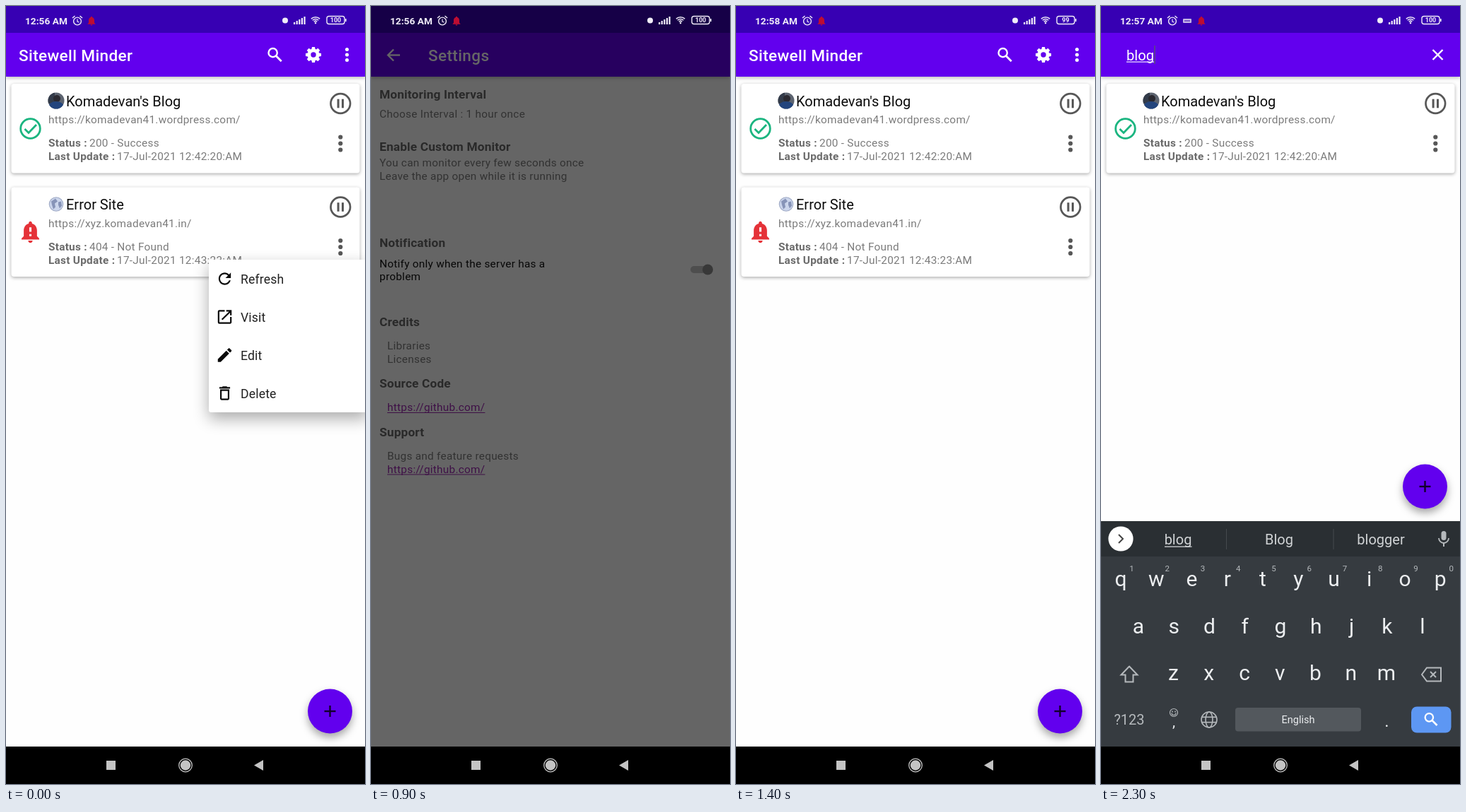
Recreate the animation shown at these times as an HTML page with a canvas. Size 508 by 1101 pixels, loop 2.6 s.

```html
<!DOCTYPE html>
<html lang="en">
<head>
<meta charset="utf-8">
<title>Sitewell Minder</title>
<style>
html, body { margin: 0; width: 100%; height: 100%; overflow: hidden; background: #fff; }
canvas { display: block; width: 508px; height: 1101px; }
</style>
</head>
<body>
<canvas id="stage" width="508" height="1101"></canvas>
<script>
const ctx = document.getElementById('stage').getContext('2d');
const W = 508, H = 1101, TAU = Math.PI * 2;
const PURPLE = '#6200ee', DEEP = '#3700b3', ACCENT = '#9c27b0';
const INK = '#212121', GREY = '#7b7b7b', ICON = '#575757', RED = '#e53238';
const BLOG = 'https://komadevan41.wordpress.com/';
const SITE = 'https://xyz.komadevan41.in/';
const APP = 'Sitewell Minder';

const ICONS = {
  refresh: 'M17.65 6.35C16.2 4.9 14.21 4 12 4c-4.42 0-7.99 3.58-7.99 8s3.57 8 7.99 8c3.73 0 6.84-2.55 7.73-6h-2.08c-.82 2.33-3.04 4-5.65 4-3.31 0-6-2.69-6-6s2.69-6 6-6c1.66 0 3.14.69 4.22 1.78L13 11h7V4z',
  visit: 'M19 19H5V5h7V3H5a2 2 0 0 0-2 2v14a2 2 0 0 0 2 2h14c1.1 0 2-.9 2-2v-7h-2zM14 3v2h3.59l-9.83 9.83 1.41 1.41L19 6.41V10h2V3z',
  edit: 'M3 17.25V21h3.75L17.81 9.94l-3.75-3.75zM20.71 7.04c.39-.39.39-1.02 0-1.41l-2.34-2.34c-.39-.39-1.02-.39-1.41 0l-1.83 1.83 3.75 3.75z',
  remove: 'M6 19c0 1.1.9 2 2 2h8c1.1 0 2-.9 2-2V7H6zM8 9h8v10H8zm7.5-5l-1-1h-5l-1 1H5v2h14V4z',
  alert: 'M18 16v-5c0-3.07-1.64-5.64-4.5-6.32V4c0-.83-.67-1.5-1.5-1.5s-1.5.67-1.5 1.5v.68C7.63 5.36 6 7.92 6 11v5l-2 2v1h16v-1zm-5 0h-2v-2h2zm0-4h-2V8h2zm-1 10c1.1 0 2-.9 2-2h-4c0 1.1.89 2 2 2z',
  bell: 'M18 16v-5c0-3.07-1.64-5.64-4.5-6.32V4c0-.83-.67-1.5-1.5-1.5s-1.5.67-1.5 1.5v.68C7.63 5.36 6 7.92 6 11v5l-2 2v1h16v-1zm-6 6c1.1 0 2-.9 2-2h-4c0 1.1.89 2 2 2z'
};
for (const k in ICONS) ICONS[k] = new Path2D(ICONS[k]);

// ---------- basic shapes ----------
function icon(name, x, y, size, color) {
  ctx.save();
  ctx.translate(x - size / 2, y - size / 2);
  ctx.scale(size / 24, size / 24);
  ctx.fillStyle = color;
  ctx.fill(ICONS[name]);
  ctx.restore();
}
function text(s, x, cy, size, color, { w = 400, ls = 0, align = 'left' } = {}) {
  ctx.font = `${w} ${size}px Roboto, "Noto Sans", sans-serif`;
  ctx.letterSpacing = ls * size + 'px';
  ctx.textAlign = align;
  ctx.fillStyle = color;
  ctx.fillText(s, x, cy + size * 0.355);
}
const body = (s, x, cy, color = GREY, w = 400) => text(s, x, cy, 15.35, color, { w, ls: 0.0178 });

function rect(x, y, w, h, color) {
  ctx.fillStyle = color;
  ctx.fillRect(x, y, w, h);
}
function box(x, y, w, h, r, color) {
  ctx.beginPath();
  ctx.roundRect(x, y, w, h, r);
  ctx.fillStyle = color;
  ctx.fill();
}
function frame(x, y, w, h, r, lw, color) {
  ctx.beginPath();
  ctx.roundRect(x, y, w, h, r);
  ctx.lineWidth = lw;
  ctx.strokeStyle = color;
  ctx.stroke();
}
function disc(x, y, r, color) {
  ctx.beginPath();
  ctx.arc(x, y, r, 0, TAU);
  ctx.fillStyle = color;
  ctx.fill();
}
function arc(x, y, r, lw, color, from = 0, to = TAU) {
  ctx.beginPath();
  ctx.arc(x, y, r, from, to);
  ctx.lineWidth = lw;
  ctx.strokeStyle = color;
  ctx.stroke();
}
function trace(pts) {
  ctx.beginPath();
  for (let i = 0; i < pts.length; i += 2) ctx.lineTo(pts[i], pts[i + 1]);
}
function line(pts, lw, color) {
  trace(pts);
  ctx.lineWidth = lw;
  ctx.strokeStyle = color;
  ctx.stroke();
}
function poly(pts, color) {
  trace(pts);
  ctx.fillStyle = color;
  ctx.fill();
}
function shadowed(blur, dy, alpha, paint) {
  ctx.save();
  ctx.shadowColor = `rgba(0,0,0,${alpha})`;
  ctx.shadowBlur = blur;
  ctx.shadowOffsetY = dy;
  paint();
  ctx.restore();
}

// ---------- small icons ----------
function gear(x, y, r, color, hole) {
  ctx.beginPath();
  for (let i = 0; i < 8; i++) {
    for (const [d, k] of [[-0.3, 0.76], [-0.18, 1], [0.18, 1], [0.3, 0.76]]) {
      const a = i * TAU / 8 + d;
      ctx.lineTo(x + Math.cos(a) * r * k, y + Math.sin(a) * r * k);
    }
  }
  ctx.closePath();
  ctx.moveTo(x + hole, y);
  ctx.arc(x, y, hole, 0, TAU);
  ctx.fillStyle = color;
  ctx.fill('evenodd');
}
function search(x, y, s, color) {
  arc(x - 2.8 * s, y - 2.8 * s, 6 * s, 2.4 * s, color);
  line([x + 1.5 * s, y + 1.5 * s, x + 9 * s, y + 9 * s], 2.8 * s, color);
}
function dots(x, y, gap, r, color) {
  for (const d of [-gap, 0, gap]) disc(x, y + d, r, color);
}
function cross(x, y, r, lw, color) {
  line([x - r, y - r, x + r, y + r], lw, color);
  line([x - r, y + r, x + r, y - r], lw, color);
}
function wifi(x, y, s, lw, color) {
  const by = y + 5 * s;
  for (const r of [4, 7.5, 11]) arc(x, by, r * s, lw, color, -TAU * 0.372, -TAU * 0.128);
  disc(x, by - 0.5 * s, 1.6 * s, color);
}
function alarm(x, y, color) {
  arc(x, y + 0.5, 5.4, 1.4, color);
  line([x, y - 2.5, x, y + 1, x + 2.5, y + 2], 1.2, color);
  line([x - 7, y - 4, x - 3.5, y - 7], 1.5, color);
  line([x + 7, y - 4, x + 3.5, y - 7], 1.5, color);
}
function signal(x, y, color) {
  for (let i = 0; i < 5; i++) rect(x + i * 3.6, y - 3 - i * 2, 2.2, 3 + i * 2, color);
}
function battery(x, y, level, color) {
  frame(x, y - 5.5, 25, 11, 3, 1.4, color);
  rect(x + 26, y - 2, 1.6, 4, color);
  text(level, x + 12.5, y, 9, color, { w: 700, align: 'center' });
}
function globe(x, y, r, lw, color) {
  arc(x, y, r, lw, color);
  line([x - r, y - r / 3, x + r, y - r / 3], lw, color);
  line([x - r, y + r / 3, x + r, y + r / 3], lw, color);
  ctx.beginPath();
  ctx.ellipse(x, y, r * 0.45, r, 0, 0, TAU);
  ctx.stroke();
}
function sun(x, y, r, len, color) {
  disc(x, y, r, color);
  for (let i = 0; i < 8; i++) {
    const c = Math.cos(i * TAU / 8), s = Math.sin(i * TAU / 8);
    line([x + c * (r + 2), y + s * (r + 2), x + c * (r + 2 + len), y + s * (r + 2 + len)], 1.8, color);
  }
}

// ---------- shared parts ----------
function statusIcons(time, level, keyboard) {
  const c = '#f1edf8';
  text(time, 27, 21, 13.7, c, { w: 700 });
  alarm(101, 21, c);
  if (keyboard) {
    box(116, 18, 12, 6, 1, '#c5b5e6');
    line([118, 21, 126, 21], 1, DEEP);
  }
  icon('bell', keyboard ? 142 : 121, 21, 16, '#bd0d32');
  disc(395, 20.5, 4, c);
  signal(407, 26, c);
  wifi(438, 20.5, 0.8, 1.5, c);
  battery(454, 20, level, c);
}
function navIcons() {
  const c = '#c4c4c4';
  rect(142, 1068, 13, 13, c);
  disc(254, 1074.5, 7.2, c);
  arc(254, 1074.5, 9.3, 1.3, c);
  poly([351, 1074.5, 364, 1067, 364, 1082], c);
}
function navBar() {
  rect(0, 1048, W, H - 1048, '#000');
  navIcons();
}
function page() {
  rect(0, 0, W, H, '#fefefe');
  shadowed(5, 2, 0.25, () => rect(0, 38, W, 62, PURPLE));
  rect(0, 0, W, 38, DEEP);
}
function homeBar() {
  text(APP, 18, 69.5, 22.6, '#fff', { w: 500, ls: 0.0155 });
  search(380.5, 69, 1.02, '#fff');
  gear(435, 69, 11.2, '#fff', 3.7);
  dots(482.5, 69, 7.4, 2.5, '#fff');
}
function fab(y) {
  shadowed(12, 6, 0.35, () => disc(458.5, y, 31.5, PURPLE));
  line([450.5, y, 466.5, y], 2.4, '#12002c');
  line([458.5, y - 8, 458.5, y + 8], 2.4, '#12002c');
}
function avatar(x, y) {
  ctx.save();
  ctx.beginPath();
  ctx.arc(x, y, 11.5, 0, TAU);
  ctx.clip();
  rect(x - 12, y - 12, 24, 24, '#5d6470');
  rect(x - 12, y - 12, 10, 16, '#333b49');
  disc(x + 1, y - 3, 5, '#2a2930');
  ctx.beginPath();
  ctx.ellipse(x, y + 9, 11, 8, 0, 0, TAU);
  ctx.fillStyle = '#23457d';
  ctx.fill();
  ctx.restore();
}
function earth(x, y) {
  disc(x, y, 10.3, '#9ea9c5');
  disc(x, y, 9.2, '#ccd6ec');
  poly([x - 7, y - 4, x - 1, y - 8, x + 2, y - 4, x - 2, y - 1, x - 1, y + 4, x - 4, y + 7, x - 6, y + 1], '#8794b8');
  poly([x + 3, y - 3, x + 7, y - 4, x + 8, y + 2, x + 5, y + 6, x + 3, y + 1], '#8794b8');
}
function card(y, site) {
  shadowed(5, 1.5, 0.33, () => box(7.5, y, 493, 126.5, 4, '#fff'));
  if (site.ok) {
    avatar(71, y + 24);
    arc(34.5, y + 63.5, 13.8, 2.8, '#1bb580');
    line([26.5, y + 64, 32, y + 69.5, 43, y + 58], 2.8, '#1bb580');
  } else {
    earth(71, y + 24);
    icon('alert', 34.5, y + 63, 37.5, RED);
  }
  text(site.name, 85, y + 24.5, 20, '#0c0c0c');
  body(site.url, 60, y + 51);
  body('Status :', 60, y + 84, '#6a6a6a', 700);
  body(site.status, 118, y + 84);
  body('Last Update :', 60, y + 103, '#6a6a6a', 700);
  body('17-Jul-2021 ' + site.time + ':AM', 157, y + 103);
  const py = y + 28;
  arc(473.3, py, 13.8, 2.7, ICON);
  if (site.paused) poly([469, py - 6.5, 479.5, py, 469, py + 6.5], ICON);
  else for (const dx of [-4.7, 1.7]) rect(473.3 + dx, py - 6.3, 3, 12.6, ICON);
  dots(473.3, y + 84.5, 9, 3.1, ICON);
}
const blogCard = (y, time = '12:42:20') =>
  card(y, { ok: true, name: "Komadevan's Blog", url: BLOG, status: '200 - Success', time });
const errorCard = (y, paused) =>
  card(y, { name: 'Error Site', url: SITE, status: '404 - Not Found', time: '12:43:23', paused });

function home(time, level, paused, fabY = 998) {
  page();
  homeBar();
  statusIcons(time, level);
  blogCard(110);
  errorCard(256.5, paused);
  fab(fabY);
  navBar();
}

// ---------- scenes ----------
function menu() {
  home('12:56 AM', '100', false);
  shadowed(22, 9, 0.33, () => box(287, 359, 225, 216, 3, '#fff'));
  [['refresh', 'Refresh'], ['visit', 'Visit'], ['edit', 'Edit'], ['remove', 'Delete']].forEach(([name, label], i) => {
    const y = 387 + i * 54;
    icon(name, 309.5, y - 1, 26, '#0a0a0a');
    text(label, 332, y, 17.6, INK, { ls: 0.0094 });
  });
  navBar();
}

function settings(dim) {
  page();
  line([41, 69.5, 24, 69.5], 2.3, '#fff');
  line([32, 61.5, 24, 69.5, 32, 77.5], 2.3, '#fff');
  text('Settings', 81, 69.5, 22.6, '#fff', { w: 500, ls: 0.0155 });
  const head = (s, y) => text(s, 12, y, 17.3, '#686868', { w: 700, ls: 0.0094 });
  const link = (s, y) => {
    body(s, 23, y, ACCENT);
    rect(23, y + 7, ctx.measureText(s).width, 1, ACCENT);
  };
  head('Monitoring Interval', 125);
  body('Choose Interval : 1 hour once', 12, 153);
  head('Enable Custom Monitor', 199);
  body('You can monitor every few seconds once', 12, 222);
  body('Leave the app open while it is running', 12, 240.5);
  head('Notification', 335);
  body('Notify only when the server has a', 12, 365, '#111');
  body('problem', 12, 383, '#111');
  box(452, 368, 28, 10, 5, '#c4c4c4');
  disc(476.5, 373, 7.5, '#8c8c8c');
  head('Credits', 447);
  body('Libraries', 23, 480.5);
  body('Licenses', 23, 499.5);
  head('Source Code', 534);
  link('https://github.com/', 568);
  head('Support', 603);
  body('Bugs and feature requests', 23, 636.5);
  link('https://github.com/', 655.5);
  if (dim) rect(0, 0, W, 1048, 'rgba(0,0,0,.6)');
  statusIcons('12:56 AM', '100');
  navBar();
}

function interval() {
  settings(true);
  shadowed(26, 14, 0.4, () => box(31, 129, 445, 827, 4, '#fff'));
  text('Choose Interval', 58.5, 166, 22, INK, { w: 500, ls: 0.0125 });
  const mins = [15, 20, 30, 45].map(n => n + ' mins');
  const hours = [2, 3, 4, 5, 6, 12, 24].map(n => n + ' hours');
  [...mins, '1 hour', ...hours, 'Weekly'].forEach((label, i) => {
    const y = 216.5 + i * 54.1, on = i === 4;
    arc(71.5, y, 10.2, 2.2, on ? ACCENT : '#707070');
    if (on) disc(71.5, y, 5.6, ACCENT);
    text(label + ' once', 112.5, y + 0.5, 19.8, '#2a2a2a', { ls: 0.0094 });
  });
  text('CANCEL', 386, 925, 15.6, '#5a0fd6', { w: 500, ls: 0.0893 });
}

function custom() {
  page();
  homeBar();
  statusIcons('12:58 AM', '99');
  frame(11.5, 112.5, 485, 81, 8, 1, '#9a9a9a');
  body('Custom monitor Running...', 23, 135);
  body('Monitoring every 2 Second once', 23, 154);
  body('Count : 2', 23, 172.5);
  shadowed(3, 1, 0.3, () => box(371, 132.5, 114.5, 41, 4, ACCENT));
  text('STOP', 405, 153, 15.4, '#fff', { w: 500, ls: 0.0893 });
  blogCard(203.5, '12:58:52');
  errorCard(350, true);
  fab(998);
  navBar();
}

function paused() {
  home('12:58 AM', '99', true, 936);
  shadowed(8, 3, 0.35, () => box(9, 985.5, 490, 53.5, 4, '#323232'));
  body('Monitoring paused - ' + SITE, 27, 1013, '#e2e2e2');
  navBar();
}

function shade() {
  const c = '#dcdcdc', dark = '#212123';
  rect(0, 0, W, H, '#6b6b6b');
  text('12:57', 19, 69, 50, c, { w: 300, ls: -0.06 });
  text('Sat, 17 Jul', 19, 109, 14.3, c);
  gear(477, 72, 11, c, 6);
  disc(366, 108, 4, c);
  alarm(386, 108, c);
  box(398.5, 102, 13, 12, 2, c);
  signal(415, 114, c);
  wifi(447, 108, 0.8, 1.5, c);
  battery(463, 108, '100', c);

  box(15, 131, 478, 138.5, 17, dark);
  for (let i = 0; i < 5; i++) disc(63.3 + i * 95.2, 181, 28.3, i === 1 ? '#0b78d1' : '#343436');
  line([60, 172, 60, 189, 56.5, 185], 2, c);
  line([67, 190, 67, 173, 70.5, 177], 2, c);
  wifi(158.5, 181, 1, 2, '#fff');
  wifi(253, 181, 1, 1.8, '#bbb');
  line([254, 189, 264, 180], 5, '#343436');
  line([256, 188, 264, 180], 2.4, '#bbb');
  line([341, 177, 357, 177, 353, 183, 353, 191, 345, 191, 345, 183, 341, 177], 1.8, c);
  for (const dx of [-6, 0, 6]) line([349 + dx, 174, 349 + dx * 1.2, 170], 1.8, c);
  line([349, 182, 349, 186], 1.6, c);
  ctx.beginPath();
  ctx.moveTo(435, 188);
  ctx.lineTo(437.5, 184);
  ctx.lineTo(437.5, 178);
  ctx.arc(444, 178, 6.5, Math.PI, 0);
  ctx.lineTo(450.5, 184);
  ctx.lineTo(453, 188);
  ctx.closePath();
  ctx.lineWidth = 1.8;
  ctx.stroke();
  line([441, 191, 447, 191], 1.8, c);
  rect(30, 229, 448, 1, '#39393b');
  disc(41, 249, 9, '#505052');
  text('?', 41, 249, 11, dark, { w: 700, align: 'center' });
  text('Today: 2.0MB', 57, 249.5, 13.1, '#8b8b8b');
  text('This month: 2.97GB', 156.5, 249.5, 13.1, '#8b8b8b');

  box(15, 281, 478, 49.5, 14, dark);
  box(15, 281, 229.5, 49.5, [14, 0, 0, 14], '#9f9f9f');
  sun(39, 306, 4.2, 1.6, '#dedede');
  sun(469, 306, 4.6, 4.6, '#cfcfcf');
  box(232.5, 344, 43, 5.5, 2.7, '#8d8d8d');

  box(15, 365.5, 478, 105.5, 18, '#262626');
  icon('alert', 43, 390, 20, '#d0d0d0');
  text(APP, 59.5, 390, 12.6, '#b4b4b4');
  text('•', 153.5, 390, 12.6, '#b4b4b4');
  text('13m', 163, 390, 12.6, '#b4b4b4');
  text('Error Site', 32.5, 415, 17.4, '#e4e4e4', { w: 500 });
  text(SITE + ' - Not Working!', 32.5, 443, 16.3, '#b9b9b9');

  shadowed(6, 2, 0.3, () => disc(253.7, 976, 29, '#3a3a3a'));
  cross(253.7, 976, 6, 1.8, '#e4e4e4');
  navIcons();
}

function keyboard() {
  const c = '#eceef0', soft = '#b5b9bc';
  rect(0, 729, W, 319, '#363b40');
  rect(0, 729, W, 50, '#2a2f33');
  disc(28, 754, 17.6, '#fff');
  line([25, 748, 31, 754, 25, 760], 2, '#444');
  const word = (s, x) => text(s, x, 755, 20, '#d0d3d5', { align: 'center' });
  word('blog', 109);
  rect(90, 764.5, 38.5, 1.3, '#d0d3d5');
  word('Blog', 252);
  word('blogger', 396);
  for (const x of [177, 328.5]) rect(x, 740, 1, 29, '#454a4e');
  box(481.5, 743, 7, 13, 3.5, soft);
  arc(485, 753, 7, 1.8, soft, 0, Math.PI);
  line([485, 760, 485, 765], 2, soft);

  const keys = (row, x, y) => [...row].forEach((k, i) => text(k, x + i * 50.25, y - 10.5, 30, c, { align: 'center' }));
  keys('qwertyuiop', 28, 821);
  [...'1234567890'].forEach((d, i) => text(d, 43.5 + i * 50.25, 795.5, 11.5, soft, { align: 'center' }));
  keys('asdfghjkl', 53, 887.5);
  keys('zxcvbnm', 102.5, 954);
  line([40, 934.5, 28.5, 946.5, 34.5, 946.5, 34.5, 956.5, 45.5, 956.5, 45.5, 946.5, 51.5, 946.5, 39.5, 934], 2, soft);
  line([454, 946, 461, 936.5, 481, 936.5, 481, 955.5, 461, 955.5, 453.5, 945.5], 2, soft);
  cross(470, 946, 4, 2, soft);
  text('?123', 40, 1010, 20, soft, { align: 'center' });
  arc(103, 1000, 5.5, 1.2, soft);
  arc(103, 1000.5, 3, 1.1, soft, 0, Math.PI);
  disc(101, 998.5, 0.9, soft);
  disc(105, 998.5, 0.9, soft);
  text(',', 103, 1012.5, 21, c, { align: 'center' });
  globe(153, 1010, 11, 1.6, soft);
  box(190, 993, 178, 33.5, 4, '#53585d');
  text('English', 279, 1010, 14.5, c, { align: 'center' });
  text('.', 404.5, 1011, 24, c, { align: 'center' });
  box(439, 991.5, 56.5, 37, 8, '#5d97f3');
  search(467, 1009.5, 0.95, '#fff');
}

function searching() {
  page();
  statusIcons('12:57 AM', '100', true);
  text('blog', 36, 69.5, 20.2, '#fff');
  rect(36, 78.5, 39, 1.3, '#e6dcff');
  rect(75, 56, 2, 26, '#5a3c96');
  cross(476.5, 69, 7, 2.4, '#fff');
  blogCard(110);
  fab(680);
  keyboard();
  navBar();
}

const scenes = [
  [0, menu],
  [300, () => settings(false)],
  [600, interval],
  [900, () => settings(true)],
  [1100, custom],
  [1400, () => home('12:58 AM', '99', false)],
  [1700, paused],
  [2000, shade],
  [2300, searching]
];
const LOOP = 2600;
const start = performance.now();

function tick() {
  const t = Math.max(0, performance.now() - start) % LOOP;
  scenes.filter(s => s[0] <= t).pop()[1]();
  requestAnimationFrame(tick);
}
tick();
</script>
</body>
</html>
```
